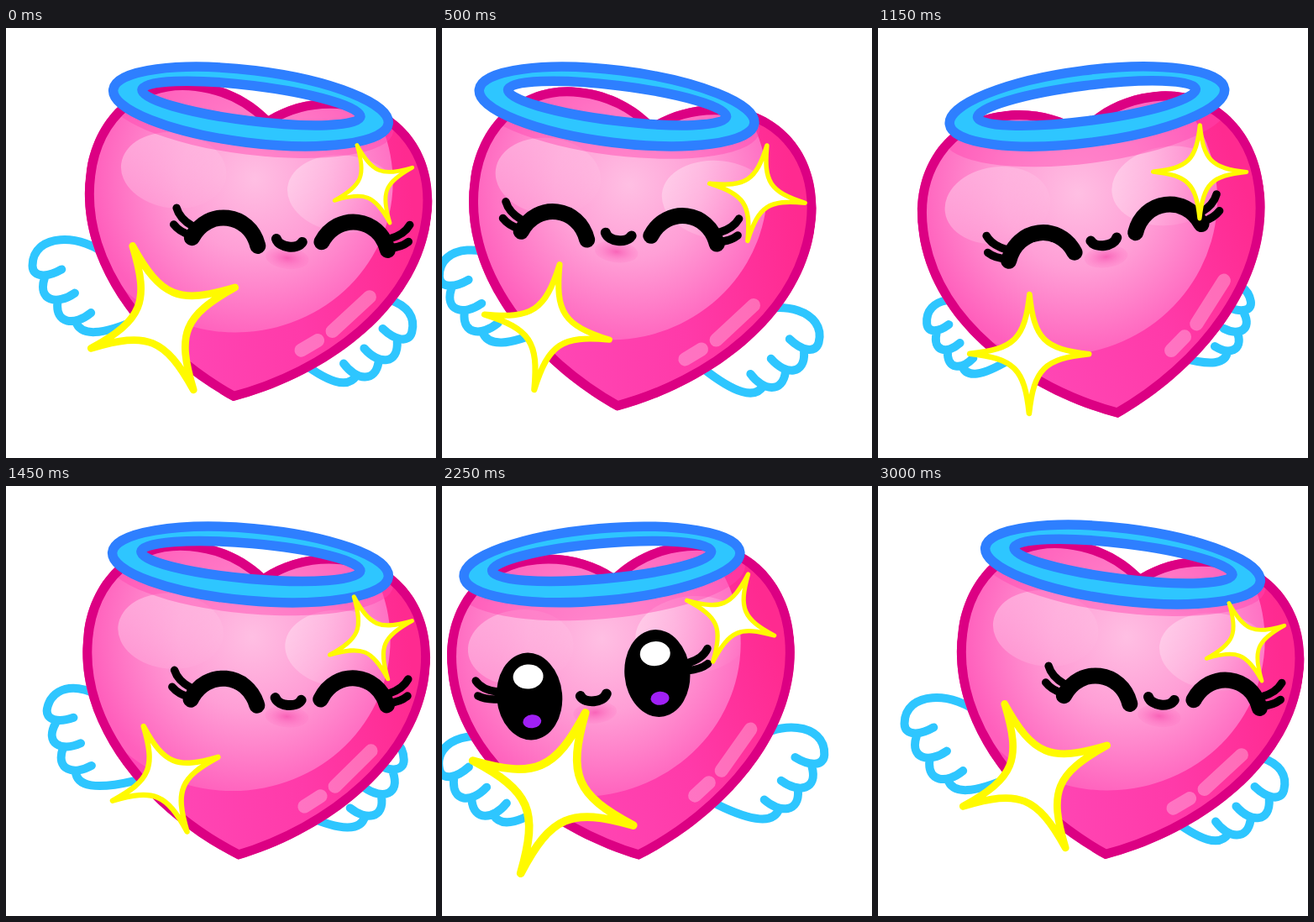
These frames come from a looping animation (512 by 512 pixels, 3050 ms). An HTML page:

```html
<!DOCTYPE html>
<html lang="en">
<head>
<meta charset="utf-8">
<title>Angel heart</title>
<style>
  html, body { margin: 0; width: 100%; height: 100%; overflow: hidden; background: #fff; }
  svg { display: block; width: 100vw; height: 100vh; }
  .line { fill: none; stroke: #000; stroke-linecap: round; stroke-linejoin: round; }
  .wing { fill: none; stroke: #2ec6ff; stroke-width: 10; stroke-linecap: round; stroke-linejoin: round; }
  .wing path { vector-effect: non-scaling-stroke; }
  .star { fill: #fff; stroke: #fffa00; stroke-width: .094; stroke-linejoin: round; }
  .ring { stroke: #2e7fff; stroke-width: 11.5; }
</style>
</head>
<body>
<svg viewBox="0 0 512 512">
  <defs>
    <path id="heart" d="M0-171C22-188 52-201 90-201C157-201 207-150 207-75C207 35 108 128 0 171C-108 128-207 35-207-75C-207-150-157-201-90-201C-52-201-22-188 0-171Z"/>
    <clipPath id="inHeart"><use href="#heart"/></clipPath>
    <clipPath id="inGlow"><ellipse cx="-40" cy="-90" rx="190" ry="181"/></clipPath>
    <linearGradient id="base" gradientUnits="userSpaceOnUse" x1="-120" y1="60" x2="200" y2="-20">
      <stop offset="0" stop-color="#ff48b6"/>
      <stop offset=".55" stop-color="#ff3aa9"/>
      <stop offset="1" stop-color="#ff2a90"/>
    </linearGradient>
    <radialGradient id="glow" gradientUnits="userSpaceOnUse" cx="-15" cy="-95" r="195">
      <stop offset="0" stop-color="#ffbfe3"/>
      <stop offset=".45" stop-color="#ff9fd6"/>
      <stop offset="1" stop-color="#ff5fbc"/>
    </radialGradient>
    <linearGradient id="shine" x1="0" y1=".2" x2="1" y2=".75">
      <stop offset="0" stop-color="#fff" stop-opacity=".36"/>
      <stop offset="1" stop-color="#fff" stop-opacity="0"/>
    </linearGradient>
    <radialGradient id="chin">
      <stop offset="0" stop-color="#f545a8" stop-opacity=".65"/>
      <stop offset="1" stop-color="#ff6cc0" stop-opacity=".15"/>
    </radialGradient>
    <g id="wing" class="wing">
      <path d="M-165 20C-205-8-262 2-257 40C-255 54-238 52-222 40M-241 53C-246 80-223 84-203 66M-222 79C-222 106-198 105-181 87M-198 99C-190 117-165 112-125 88"/>
    </g>
    <path id="star" class="star" d="M0-1C.08-.25 .25-.08 1 0C.25 .08 .08 .25 0 1C-.08 .25-.25 .08-1 0C-.25-.08-.08-.25 0-1Z"/>
    <g id="shut">
      <path class="line" stroke-width="19" d="M-39.5 0C-25-38 25-38 39.5 0"/>
      <path class="line" stroke-width="9.5" d="M-62-33Q-57-21-41-14M-63-13Q-55-5-42-3"/>
    </g>
    <g id="open">
      <ellipse cy="-16" rx="39" ry="52"/>
      <ellipse cx=".5" cy="-39.5" rx="18" ry="14.5" fill="#fff"/>
      <path class="line" stroke-width="9.5" d="M-62-40Q-56-29-38-25M-61-22Q-52-16-36-16"/>
    </g>
  </defs>

  <g id="wings">
    <g class="flap"><use href="#wing"/></g>
    <g transform="translate(-56 23) scale(-1 1)"><g class="flap"><use href="#wing"/></g></g>
  </g>

  <g id="body">
    <g clip-path="url(#inHeart)">
      <use href="#heart" fill="url(#base)"/>
      <g id="light" clip-path="url(#inGlow)">
        <rect x="-240" y="-280" width="400" height="380" fill="url(#glow)"/>
        <ellipse cx="-112" cy="-93" rx="63" ry="45" fill="url(#shine)"/>
        <ellipse cx="93" cy="-90" rx="68" ry="46" fill="url(#shine)"/>
      </g>
      <path d="M73 101L91 87M107 74L146 28" fill="none" stroke="#fff" stroke-opacity=".29" stroke-width="16" stroke-linecap="round"/>
      <ellipse id="shade" rx="171" ry="48.5" fill="#ff45b0" opacity=".45"/>
      <use href="#heart" fill="none" stroke="#dc0083" stroke-width="22"/>
    </g>
  </g>

  <g id="halo" fill="none">
    <path fill="#2ec6ff" fill-rule="evenodd" d="M-165 0A165 43 0 1 1 165 0A165 43 0 1 1-165 0ZM-131-4A131 21 0 1 1 131-4A131 21 0 1 1-131-4Z"/>
    <ellipse class="ring" rx="165" ry="43"/>
    <ellipse class="ring" cy="-4" rx="131" ry="21"/>
  </g>

  <g id="face">
    <ellipse cy="18" rx="26" ry="13" fill="url(#chin)"/>
    <path class="line" stroke-width="12" d="M-15.5-3C-11 7 11 7 15.5-3"/>
    <g id="eyesShut">
      <use href="#shut" x="-76" y="8"/>
      <use href="#shut" transform="translate(78 -6) scale(-1 1)"/>
    </g>
    <g id="eyesOpen">
      <use href="#open" x="-76" y="8"/>
      <use href="#open" transform="translate(78 -6) scale(-1 1)"/>
      <ellipse cx="-75.5" cy="22" rx="11" ry="8" fill="#a020f5"/>
      <ellipse cx="78.5" cy="8" rx="11" ry="8" fill="#a020f5"/>
    </g>
  </g>

  <g id="stars">
    <use id="bigStar" href="#star"/>
    <use id="smallStar" href="#star"/>
  </g>
</svg>
<script>
  const LOOP = 3050, STEP = 50, SWAY = 1500;
  const FLAP = [[0, 1, 1], [4, .87, .88], [12, .72, .75], [10, .75, .82], [14, .95, 1]]; // angle, width, height
  const TWINKLE = [1, .75, .73];
  const el = id => document.getElementById(id);
  const put = (node, value) => node.setAttribute('transform', value);
  const flaps = document.querySelectorAll('.flap');

  // cubic-bezier(.58, 0, .42, 1)
  function ease(x) {
    let lo = 0, hi = 1;
    for (let i = 0; i < 24; i++) {
      const m = (lo + hi) / 2, n = 1 - m;
      if (3 * m * n * (.58 * n + .42 * m) + m * m * m < x) lo = m; else hi = m;
    }
    return lo * lo * (3 - 2 * lo);
  }

  // 0 at the right end of the sway, 1 at the left
  function sway(t) {
    const u = ((t % SWAY) + SWAY) % SWAY / (SWAY / 2);
    return ease(u < 1 ? u : 2 - u);
  }

  function draw(t) {
    const p = sway(t);
    const dip = Math.sin(Math.PI * t / 750) ** 4;
    const tilt = 10.3 - 18.6 * sway(t - 250);
    const lean = tilt - 7;
    const spin = -23 + 45 * sway(t - 30) - tilt;
    const x = 291.5 - 75 * p - .25 * lean, y = 274.5 + 17 * dip;
    const hx = 291.5 - 101 * p, hy = 93.5;
    const frame = Math.round(t / STEP);

    put(el('body'), `translate(${x} ${y}) rotate(${tilt}) scale(1 ${1 + .02 * dip})`);
    put(el('stars'), `translate(${x} ${y}) rotate(${tilt})`);
    put(el('light'), `translate(${8 - 14 * p} 0)`);
    put(el('shade'), `rotate(${-tilt}) translate(${hx - x} ${hy - y + 9 + 4 * dip - .6 * lean}) rotate(${tilt})`);
    put(el('halo'), `translate(${hx} ${hy}) rotate(${tilt})`);
    put(el('face'), `translate(${337 - 154 * p + .2 * lean} ${256 - 7.5 * p - 2.2 * dip - .27 * lean}) rotate(${tilt})`);

    put(el('wings'), `translate(${291.5 - 42 * p} ${275 + 22 * dip}) rotate(${tilt})`);
    const [angle, width, height] = FLAP[frame % FLAP.length];
    flaps.forEach(f => put(f, `translate(-130 60) rotate(${angle}) scale(${width} ${height}) translate(130 -60)`));

    const beat = frame % TWINKLE.length;
    const big = (93 + 10 * p) * TWINKLE[beat];
    const small = (53 + 6 * p) * (beat ? 1 : .95);
    put(el('bigStar'), `translate(-95 ${83 + 2.5 * dip}) rotate(${spin}) scale(${big})`);
    put(el('smallStar'), `translate(134 ${-106 + 2.5 * dip}) rotate(${spin}) scale(${small})`);

    const awake = t >= 1600 && t < 2850;
    el('eyesOpen').style.display = awake ? '' : 'none';
    el('eyesShut').style.display = awake ? 'none' : '';
  }

  const start = performance.now();
  function tick() {
    const t = (performance.now() - start) % LOOP;
    draw(Math.floor(t / STEP) * STEP);
    requestAnimationFrame(tick);
  }
  tick();
</script>
</body>
</html>
```
